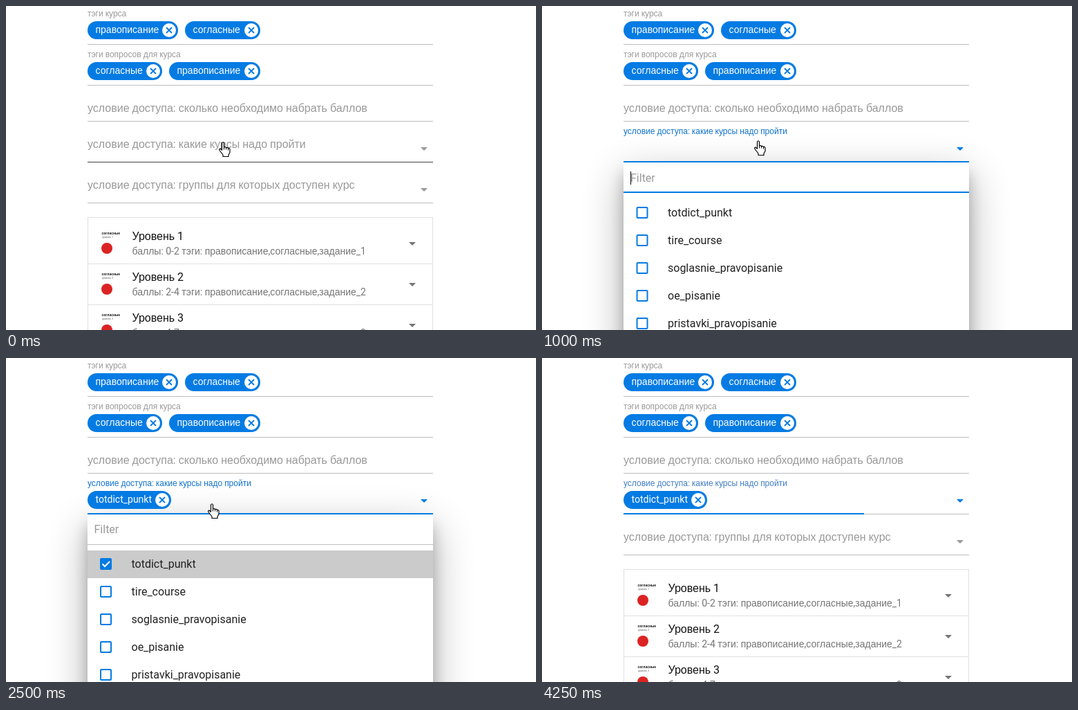
These frames come from a looping animation (767x468 px, 4.5 s). An HTML page:

```html
<!DOCTYPE html>
<html lang="ru">
<head>
<meta charset="utf-8">
<title>Форма курса</title>
<style>
  html, body { margin: 0; width: 100%; height: 100%; overflow: hidden; background: #fff; }
  svg { display: block; }
  text { font-family: "Liberation Sans", Arial, sans-serif; white-space: pre; }
  .latin { font-family: Roboto, sans-serif; }
</style>
</head>
<body>
<svg id="stage" width="767" height="468" viewBox="0 0 767 468"></svg>
<script>
const LOOP = 4500, STEP = 250;
const LEFT = 118, WIDTH = 500;
const BLUE = '#047be3', GRAY = '#999', RULE = '#bdbdbd';
const COURSE_LABEL = 'условие доступа: какие курсы надо пройти';
const OPTIONS = ['totdict_punkt', 'tire_course', 'soglasnie_pravopisanie', 'oe_pisanie', 'pristavki_pravopisanie'];

// Top left corner of the pointer at each step; it is hidden afterwards.
const POINTER = [
  [308, 196], [307, 195], [307, 194], [307, 194], [307, 194], [230, 296], [228, 298],
  [236, 308], [256, 288], [286, 222], [292, 210], [292, 210], [292, 210], [345, 437]
];

const rect = (x, y, w, h, fill, more = '') =>
  `<rect x="${x}" y="${y}" width="${w}" height="${h}" fill="${fill}" ${more}/>`;
const path = (d, more) => `<path d="${d}" ${more}/>`;
const rule = (y, color = RULE) => rect(LEFT, y, WIDTH, 1, color);
const arrow = (x, y, color) => path(`M${x} ${y}h10l-5 5z`, `fill="${color}"`);

// Cyrillic runs use the fallback face, everything else is Roboto.
function text(x, y, size, fill, string, more = '') {
  const runs = string.replace(/[^а-яё]+/gi, run => `<tspan class="latin">${run}</tspan>`);
  return `<text x="${x}" y="${y}" font-size="${size}" fill="${fill}" ${more}>${runs}</text>`;
}

function chip(x, y, width, label) {
  const cx = x + width - 13, cy = y + 13;
  return rect(x, y, width, 26, BLUE, 'rx="13"') +
    text(x + 11.5, y + 17, 14, '#fff', label) +
    `<circle cx="${cx}" cy="${cy}" r="10" fill="#fff"/>` +
    path(`M${cx - 4} ${cy - 4}l8 8m0 -8l-8 8`, `stroke="${BLUE}" stroke-width="1.8"`);
}

function level(n, points) {
  const y = 313 + (n - 1) * 59;
  return text(138.5, y + 17, 5, '#111', 'согласные', 'font-weight="bold"') +
    text(139, y + 22, 3.5, '#555', 'уровень ' + n) +
    `<circle cx="146" cy="${y + 37}" r="8" fill="#dc2323"/>` +
    text(182.5, y + 25, 16, '#111', 'Уровень ' + n) +
    text(182.5, y + 46, 14, '#757575', `баллы: ${points} тэги: правописание,согласные,задание_${n}`) +
    arrow(583, y + 28, '#757575') +
    rule(y + 59, '#e0e0e0');
}

const page =
  text(LEFT, 15, 12, GRAY, 'тэги курса') +
  chip(118, 22, 131, 'правописание') + chip(259, 22, 109, 'согласные') + rule(55) +
  text(LEFT, 74, 12, GRAY, 'тэги вопросов для курса') +
  chip(118, 81, 108, 'согласные') + chip(236, 81, 132, 'правописание') + rule(114) +
  text(LEFT, 153, 16, GRAY, 'условие доступа: сколько необходимо набрать баллов') + rule(166) +
  text(LEFT, 264, 16, GRAY, 'условие доступа: группы для которых доступен курс') +
  arrow(600, 263, GRAY) + rule(284) +
  rect(118.5, 305.5, 499, 200, 'none', 'stroke="#e0e0e0"') +
  level(1, '0-2') + level(2, '2-4') + level(3, '4-7');

function courseField(step) {
  const raised = step < 2 ? 0 : step === 2 ? 0.17 : 1;
  const color = step < 2 ? GRAY : step === 2 ? '#7f9cb9' : step === 17 ? '#3f7dc4' : '#0f72cc';
  const arrowColor = step < 2 ? GRAY : step === 2 ? '#6392c0' : BLUE;
  const lineColor = step === 0 ? '#424242' : step < 3 ? '#000' : RULE;
  const focus = step < 2 ? 0 : step === 2 ? 123 : step === 17 ? 348 : WIDTH;
  return text(LEFT, 205 - 20 * raised, 16 - 4 * raised, color, COURSE_LABEL) +
    arrow(600, 204, arrowColor) + rule(225, lineColor) +
    rect(LEFT, 224, focus, 2, BLUE) +
    (step >= 7 ? chip(118, 192, 121, OPTIONS[0]) : '');
}

function option(name, i, step) {
  const y = 298 + i * 40;
  const checked = i === 0 && step >= 7;
  return rect(137, y - 8, 15, 15, checked ? BLUE : 'none', `rx="1" stroke="${BLUE}" stroke-width="2"`) +
    (checked ? path(`M139.5 ${y - 0.5}l3.5 3.5l7 -7`, 'fill="none" stroke="#fff" stroke-width="2"') : '') +
    text(181.5, y + 5, 16, '#212121', name);
}

function menu(step) {
  if (step < 3 || step > 10) return '';
  const shadow = (dy, blur, alpha) =>
    rect(LEFT, 226 + dy, WIDTH, 400, '#000', `style="opacity:${alpha};filter:blur(${blur}px)"`);
  const highlight = step < 5 ? '' : rect(LEFT, 278, WIDTH, 40, step === 5 ? '#e2e2e2' : '#cbcbcb');
  const focus = step < 8 ? WIDTH : step === 8 ? 80 : 0;
  const opening = step === 3
    ? 'opacity="0.95" transform="translate(118 226) scale(0.99 0.95) translate(-118 -226)"' : '';
  const nudge = step < 5 ? 'transform="translate(0.5 1)"' : '';
  return `<g ${opening}>` + shadow(19, 30, 0.3) + shadow(15, 10, 0.22) +
    rect(LEFT, 226, WIDTH, 400, '#fff') + highlight +
    rule(269) + rect(LEFT, 268, focus, 2, BLUE) +
    `<g ${nudge}>` + text(127.5, 253, 16, GRAY, 'Filter') +
    OPTIONS.map((name, i) => option(name, i, step)).join('') + '</g>' +
    (step === 4 ? rect(128, 239, 1, 19, '#000') : '') + '</g>';
}

function pointer(step) {
  if (!POINTER[step]) return '';
  const [x, y] = POINTER[step];
  return path('M4.5 2q1.5 -2.5 3 0v6q2 -1 3 .6q2 -.8 3 .9q2.5 -.4 2.5 2v4l-2 3.500v2.500h-8v-2.500l-5 -6.500q-1 -2.300 1.300 -2.300l2.200 2z',
    `transform="translate(${x} ${y})" fill="#fff" stroke="#000" stroke-width="1.2" stroke-linejoin="round"`) +
    path('M7.500 8v3.500m3 -3v3m3 -2v3', `transform="translate(${x} ${y})" stroke="#000"`);
}

const stage = document.getElementById('stage');
let shown = -1;

function tick() {
  const step = Math.floor(performance.now() % LOOP / STEP);
  if (step !== shown) {
    stage.innerHTML = page + menu(step) + courseField(step) + pointer(step);
    shown = step;
  }
  requestAnimationFrame(tick);
}
tick();
</script>
</body>
</html>
```
